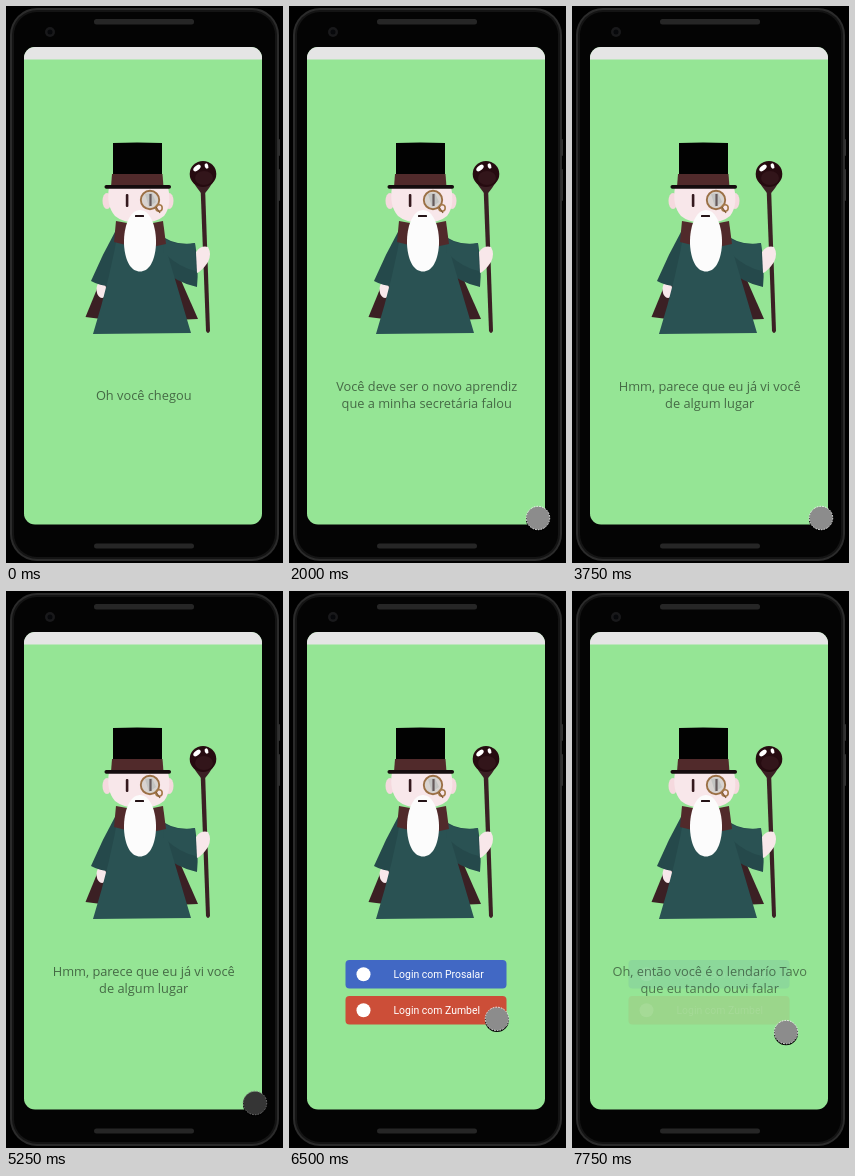
Write an HTML page with a canvas that moves like this. It is 277x557 px and loops after 8000 ms.

```html
<!DOCTYPE html>
<html lang="pt">
<head>
<meta charset="utf-8">
<title>Login com o mago</title>
<style>
html, body { margin: 0; width: 100%; height: 100%; overflow: hidden; background: #000; }
canvas { display: block; width: 277px; height: 557px; }
</style>
</head>
<body>
<canvas id="stage" width="277" height="557"></canvas>
<script>
const ctx = document.getElementById('stage').getContext('2d');
const LOOP = 8000;
const FADE = 580;
const GREEN = '#95e595';
const ROBE = '#2a5253';
const ROBE_DARK = '#25494b';
const CAPE = '#3b2024';
const COLLAR = '#512a2b';
const SKIN = '#f8e7ea';

// Each scene cross-fades into the next one at its start time.
const scenes = [
  { start: -FADE, lines: ['Oh você chegou'] },
  { start: 1220, lines: ['Você deve ser o novo aprendiz', 'que a minha secretária falou'] },
  { start: 3150, lines: ['Hmm, parece que eu já vi você', 'de algum lugar'] },
  { start: 5250, buttons: true },
  { start: 7230, lines: ['Oh, então você é o lendarío Tavo', 'que eu tando ouvi falar'] }
];

// Pointer path: time, x, y
const path = [
  [0, 150, 600], [250, 194, 566], [500, 245, 528], [700, 249, 512],
  [6030, 249, 512], [6250, 237, 495], [6500, 208, 428], [6700, 200, 400],
  [7270, 200, 400], [7500, 204, 412], [7750, 214, 441], [8000, 224, 470]
];
const presses = [[2900, 3150], [5150, 5400], [6900, 7150]];

const clamp = v => Math.max(0, Math.min(1, v));

function box(x, y, w, h, r, fill) {
  ctx.beginPath();
  ctx.roundRect(x, y, w, h, r);
  ctx.fillStyle = fill;
  ctx.fill();
}

function oval(x, y, rx, ry, fill, turn = 0) {
  ctx.beginPath();
  ctx.ellipse(x, y, rx, ry, turn, 0, Math.PI * 2);
  ctx.fillStyle = fill;
  ctx.fill();
}

function ring(x, y, r, color, width) {
  ctx.beginPath();
  ctx.arc(x, y, r, 0, Math.PI * 2);
  ctx.strokeStyle = color;
  ctx.lineWidth = width;
  ctx.stroke();
}

function shape(d, fill) {
  ctx.fillStyle = fill;
  ctx.fill(new Path2D(d));
}

function line(d, color, width) {
  ctx.strokeStyle = color;
  ctx.lineWidth = width;
  ctx.stroke(new Path2D(d));
}

function drawPhone() {
  ctx.fillStyle = '#000';
  ctx.fillRect(0, 0, 277, 557);
  box(4, 2, 269, 553, 27, '#2b2b2b');
  box(6, 4, 265, 549, 25, '#141414');
  box(8, 6, 261, 545, 23, '#040404');
  box(272, 133, 2, 17, 1, '#303030');
  box(272, 163, 2, 32, 1, '#303030');
  box(88, 13, 100, 5.5, 2.5, '#262626');
  box(88, 537.5, 100, 5, 2.5, '#262626');
  oval(44, 26, 5, 5, '#19191b');
  oval(44, 26, 2.5, 2.5, '#07080b');

  ctx.save();
  ctx.beginPath();
  ctx.roundRect(18, 41, 238, 477.5, 11);
  ctx.clip();
  ctx.fillStyle = GREEN;
  ctx.fillRect(18, 41, 238, 478);
  ctx.fillStyle = '#e5e5e5';
  ctx.fillRect(18, 41, 238, 12.5);
  ctx.restore();
}

function drawBody() {
  shape('M116 222 L79.5 311 L103 314 L168 314 L192 313 L152 222 Z', CAPE);
  oval(95.5, 284, 5, 8, SKIN, -0.1);
  shape('M110 224 Q96 249 85 275 Q94 280 104 280 L122 232 Z', ROBE_DARK);
  shape('M150 226 Q168 241 189 237 Q193 261 191 281 Q171 277 153 261 Z', ROBE_DARK);
  shape('M113 219 Q105 270 87 328 L185 327 L158 236 L156 220 Z', ROBE);
  shape('M156 231 Q170 241 189 237 L190 265 Q174 262 158 247 Z', ROBE);
  shape('M110 215 L121 217 L124 240 L108 236 Z', COLLAR);
  shape('M147 217 L157 215 L160 238 L146 241 Z', COLLAR);
}

function drawStaff() {
  shape('M194.5 180 L199 180 L204 325 Q202 329 200 325 Z', CAPE);
  shape('M186 174 L208 174 Q203 183 199 187 L195 187 Q190 181 186 174 Z', CAPE);
  oval(197, 168, 13.3, 13, '#260b10');
  oval(198, 172, 9, 7, '#32151a');
  oval(191, 162, 4.3, 2.4, '#fff', -0.7);
  oval(200.5, 160, 1.8, 2.7, '#fff', -0.3);
  shape('M190 246 Q195 239 202 241 Q206 248 202 256 Q196 265 191 267 Z', SKIN);
}

function drawHead() {
  oval(101, 195, 4.5, 8, '#f5d9de');
  oval(163, 195, 4.5, 8, '#f5d9de');
  shape('M103 181 H162 Q166 200 158 210 Q150 217 134 217 Q117 217 109 210 Q100 200 103 181 Z', SKIN);
  shape('M134 204 C144 204 150.5 220 150 238 C149 257 142 265.5 134 265.5 C126 265.5 119 257 118 238 C117.5 220 124 204 134 204 Z', '#fcfcfc');
  box(119.8, 188, 2.6, 13, 1, '#35191e');
  box(129, 209, 9, 2, 0.5, '#241316');

  oval(144, 194, 9, 9, '#d8d3d0');
  shape('M139 188 L146 187 L150 196 L143 201 Z', '#c3c4c2');
  line('M144.5 188 V200', '#655a5b', 2.2);
  ring(144, 194, 9.2, '#9b7046', 1.9);
  ring(153, 202, 3.2, '#a57a4a', 1.6);
  line('M150 201 L154 207', '#805834', 1.3);

  shape('M107 137 Q131 136 156 137 L156 169 H107 Z', '#020202');
  shape('M106 168 H156.5 L157.5 181 H105 Z', COLLAR);
  box(98.5, 179, 66.5, 3.7, 1.8, '#150c0e');
}

function drawButton(y, color, label) {
  box(56.5, y, 161, 28.5, 4, color);
  oval(74.5, y + 14.2, 7, 7, '#fff');
  ctx.font = "10.45px Roboto, sans-serif";
  ctx.textAlign = 'left';
  ctx.fillStyle = '#fff';
  ctx.fillText(label, 104.5, y + 18);
}

function drawLines(lines) {
  ctx.font = "12.8px 'Open Sans', sans-serif";
  ctx.textAlign = 'center';
  ctx.fillStyle = 'rgba(0, 0, 0, 0.54)';
  const first = lines.length === 1 ? 393.5 : 385;
  lines.forEach((text, i) => ctx.fillText(text, 137.7, first + i * 17.4));
}

function drawScene(scene, alpha) {
  ctx.globalAlpha = alpha;
  if (scene.buttons) {
    drawButton(369, '#4168c4', 'Login com Prosalar');
    drawButton(405, '#cc4e38', 'Login com Zumbel');
  } else {
    drawLines(scene.lines);
  }
  ctx.globalAlpha = 1;
}

function drawScenes(t) {
  scenes.forEach((scene, i) => {
    const next = scenes[i + 1];
    const fadeIn = clamp((t - scene.start) / FADE);
    const fadeOut = next ? clamp((t - next.start) / FADE) : 0;
    const alpha = fadeIn * (1 - fadeOut);
    if (alpha > 0) drawScene(scene, alpha);
  });
}

function pointerAt(t) {
  const i = path.findIndex(p => p[0] > t);
  const [t0, x0, y0] = path[i - 1];
  const [t1, x1, y1] = path[i];
  const k = (t - t0) / (t1 - t0);
  return [x0 + (x1 - x0) * k, y0 + (y1 - y0) * k];
}

function drawPointer(t) {
  const [x, y] = pointerAt(t);
  const pressed = presses.some(([from, to]) => t >= from && t < to);
  oval(x, y + 1.2, 12, 12, '#000');
  oval(x, y, 11.5, 11.5, pressed ? '#353535' : '#8c8c8c');
  ctx.setLineDash([1.6, 1.2]);
  ring(x, y, 11.7, pressed ? '#777' : '#f2f2f2', 1);
  ctx.setLineDash([]);
}

function frame(now) {
  const t = now % LOOP;
  drawPhone();
  drawBody();
  drawStaff();
  drawHead();
  drawScenes(t);
  drawPointer(t);
  requestAnimationFrame(frame);
}
requestAnimationFrame(frame);
</script>
</body>
</html>
```
